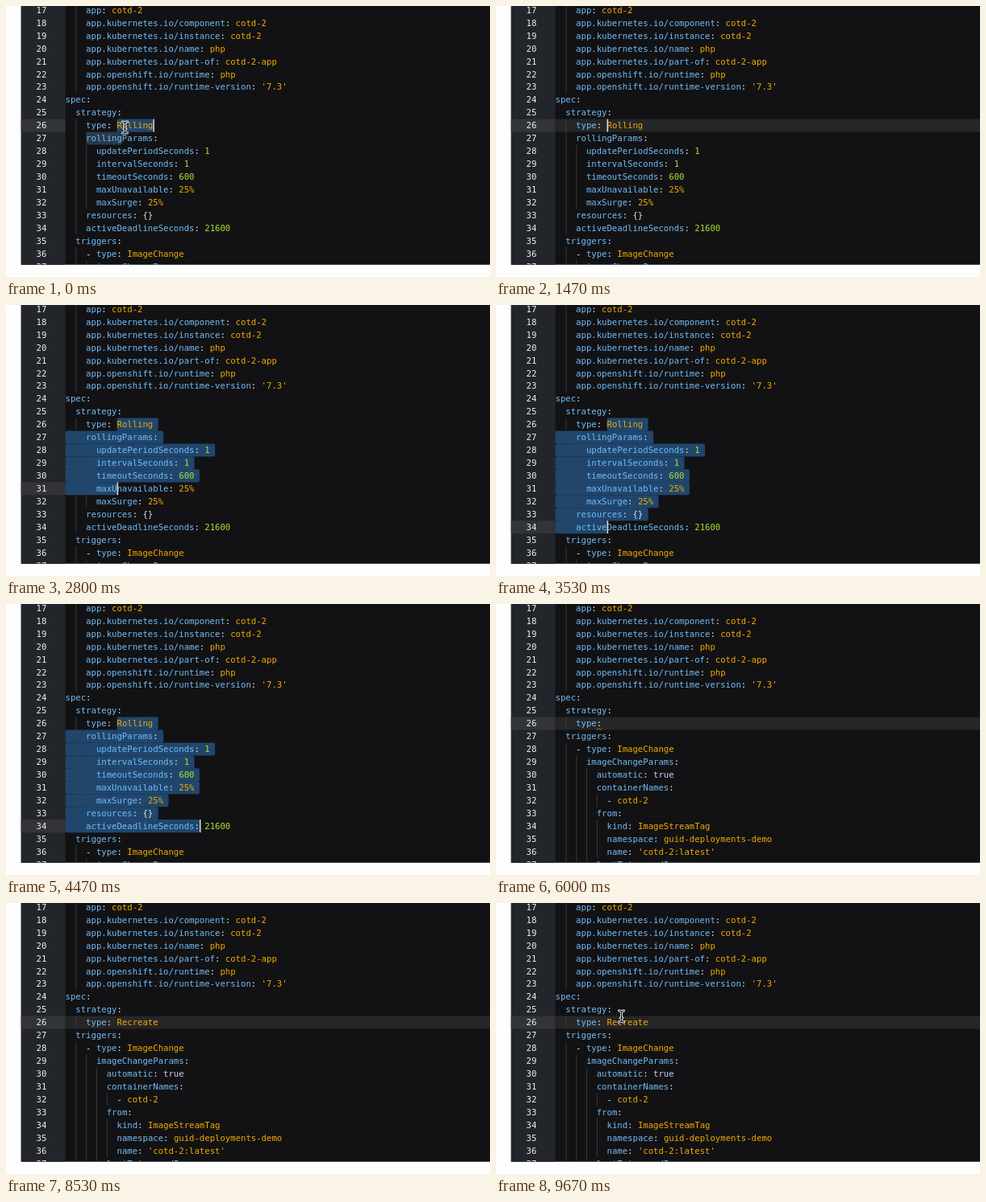
Write an HTML page that moves like this. It is 600 px wide and 337 px high and loops after 9.74 s.

```html
<!DOCTYPE html>
<html lang="en">
<head>
<meta charset="utf-8">
<title>YAML editor</title>
<style>
  html, body { margin: 0; width: 100%; height: 100%; overflow: hidden; background: #fefeff; }
  svg { display: block; width: 600px; height: 337px; }
  text { font: 10.63px "DejaVu Sans Mono", monospace; white-space: pre; fill: #e2e2e2; }
  .num { fill: #f0f0f0; }
  .key { fill: #73bcf7; }
  .str { fill: #f0ab00; }
  .int { fill: #ace12e; }
  .bool { fill: #d3ccff; }
  .guide { fill: #3c3c3e; }
  .sel { fill: #20466d; }
</style>
</head>
<body>
<svg viewBox="0 0 600 337">
  <defs><clipPath id="pane"><rect x="18.5" width="581.5" height="321.7"/></clipPath></defs>
  <g clip-path="url(#pane)">
    <rect x="18.5" width="582" height="322" fill="#121214"/>
    <rect x="18.5" width="55" height="322" fill="#22262a"/>
    <rect id="gutterBand" x="18.5" width="55" fill="#333438"/>
    <rect id="band" x="73.5" width="527" fill="#262628"/>
    <rect id="match" rx="2" fill="#28394a"/>
    <g id="selection"></g>
    <g id="head"></g>
    <g id="before"></g>
    <g id="after"></g>
    <path id="squiggle" fill="none" stroke="#6fae4f" stroke-width=".9"/>
    <rect id="caret" width="1.6" fill="#d8d8d8"/>
  </g>
  <g id="pointer" fill="none" stroke-linecap="round">
    <path stroke="#fff" stroke-width="2.8" d="M-3-7Q0-7 0-5Q0-7 3-7M0-5V5M-3 7Q0 7 0 5Q0 7 3 7M-1.5 2H1.5"/>
    <path stroke="#111" stroke-width="1.2" d="M-3-7Q0-7 0-5Q0-7 3-7M0-5V5M-3 7Q0 7 0 5Q0 7 3 7M-1.5 2H1.5"/>
  </g>
</svg>
<script>
const LOOP = 9740, CHAR = 6.4, ROW = 15.94, LEFT = 73.5;
const $ = id => document.getElementById(id);
const colX = c => LEFT + c * CHAR;
const rowY = n => 140.6 + (n - 26) * ROW;

const headText = `    app: cotd-2
    app.kubernetes.io/component: cotd-2
    app.kubernetes.io/instance: cotd-2
    app.kubernetes.io/name: php
    app.kubernetes.io/part-of: cotd-2-app
    app.openshift.io/runtime: php
    app.openshift.io/runtime-version: '7.3'
spec:
  strategy:`.split('\n');

const beforeText = `    type: Rolling
    rollingParams:
      updatePeriodSeconds: 1
      intervalSeconds: 1
      timeoutSeconds: 600
      maxUnavailable: 25%
      maxSurge: 25%
    resources: {}
    activeDeadlineSeconds: 21600
  triggers:
    - type: ImageChange
      imageChangeParams:`.split('\n');

const afterText = `    type: Recreate
  triggers:
    - type: ImageChange
      imageChangeParams:
        automatic: true
        containerNames:
          - cotd-2
        from:
          kind: ImageStreamTag
          namespace: guid-deployments-demo
          name: 'cotd-2:latest'
        lastTriggeredImage: >-`.split('\n');

function add(parent, tag, attrs = {}, text = '') {
  const el = document.createElementNS('http://www.w3.org/2000/svg', tag);
  for (const k in attrs) el.setAttribute(k, attrs[k]);
  el.textContent = text;
  return parent.appendChild(el);
}

function set(el, attrs) {
  for (const k in attrs) el.setAttribute(k, attrs[k]);
}

const show = (el, on) => el.setAttribute('visibility', on ? 'visible' : 'hidden');

function valueClass(v) {
  if (/^\d+$/.test(v)) return 'int';
  if (v === 'true') return 'bool';
  return /^[{>]/.test(v) ? 'punct' : 'str';
}

function drawLines(group, lines, first) {
  lines.forEach((line, i) => {
    const n = first + i, y = rowY(n) + 11.7;
    const [, pad, dash, key, colon, value] = line.match(/^( *)(- )?(?:([\w.\/-]+)(:) ?)?(.*)$/);
    for (let c = 2; c < pad.length; c += 2)
      add(group, 'rect', { class: 'guide', x: colX(c) + .2, y: rowY(n), width: .9, height: ROW });
    add(group, 'text', { class: 'num', x: 37.5, y }, n);
    const row = add(group, 'text', { x: colX(pad.length), y });
    if (dash) add(row, 'tspan', {}, dash);
    if (key) {
      add(row, 'tspan', { class: 'key' }, key);
      add(row, 'tspan', {}, colon + ' ');
    }
    const span = add(row, 'tspan', { class: valueClass(value) }, value);
    if (value === 'Recreate') typed = span;
  });
}

let typed;
drawLines($('head'), headText, 17);
drawLines($('before'), beforeText, 26);
drawLines($('after'), afterText, 26);

const selRects = beforeText.slice(0, 9).map((_, i) =>
  add($('selection'), 'rect', { class: 'sel', y: rowY(26 + i), height: ROW + .1, rx: 2 }));

for (const id of ['band', 'gutterBand', 'caret', 'match']) $(id).setAttribute('height', ROW);
set($('match'), { x: colX(4), y: rowY(27), width: 7 * CHAR });
$('squiggle').setAttribute('d', `M${colX(8)} ${rowY(26) + 14.2}l1.6 1.6l1.6-1.6l1.6 1.6l1.6-1.6`);

// Key presses, in ms
const COLLAPSE = 1100, DOWN = 1930, DOWN_STEP = 205, RIGHT = 3560, RIGHT_STEP = 56;
const REMOVE = 5400, TYPE = 6130, TYPE_STEP = 120, WORD = 'Recreate';
const steps = (t, start, step, max) =>
  t < start ? 0 : Math.min(max, 1 + Math.floor((t - start) / step));

// Caret place and the time of the last key press
function caretAt(t) {
  if (t < COLLAPSE) return { line: 26, col: 17, last: 0 };
  if (t < DOWN) return { line: 26, col: 10, last: COLLAPSE };
  if (t < REMOVE) {
    const down = steps(t, DOWN, DOWN_STEP, 8);
    const right = steps(t, RIGHT + RIGHT_STEP, RIGHT_STEP, 22);
    const last = right ? RIGHT + right * RIGHT_STEP : DOWN + (down - 1) * DOWN_STEP;
    return { line: 26 + down, col: 10 + right, last };
  }
  const n = steps(t, TYPE, TYPE_STEP, WORD.length);
  return { line: 26, col: 10 + n, last: n ? TYPE + (n - 1) * TYPE_STEP : REMOVE };
}

function drawSelection(line, col, on) {
  selRects.forEach((r, i) => {
    const n = 26 + i;
    show(r, on && n <= line);
    const from = n === 26 ? 10 : 0;
    const to = n === line ? col : beforeText[i].length + 1;
    set(r, { x: colX(from), width: Math.max(0, to - from) * CHAR });
  });
}

function drawPointer(t) {
  const p = Math.min(1, Math.max(0, (t - 8900) / 500));
  const e = p * p * (3 - 2 * p);
  show($('pointer'), t < COLLAPSE || t >= 8900);
  $('pointer').setAttribute('transform', `translate(${147.5 + 8 * e} ${151 - 10 * e})`);
}

function draw(t) {
  const { line, col, last } = caretAt(t);
  const selecting = t < COLLAPSE || (t >= DOWN && t < REMOVE);
  const removed = t >= REMOVE;
  show($('before'), !removed);
  show($('after'), removed);
  typed.textContent = WORD.slice(0, removed ? col - 10 : 0);
  drawSelection(line, col, selecting);
  show($('match'), t < COLLAPSE);
  show($('band'), !selecting);
  set($('band'), { y: rowY(line) });
  set($('gutterBand'), { y: rowY(line) });
  show($('squiggle'), t >= 5900 && t < TYPE + 2 * TYPE_STEP);
  set($('caret'), { x: colX(col), y: rowY(line) });
  show($('caret'), (t - last) % 1000 < 500);
  drawPointer(t);
}

const start = performance.now();
function tick() {
  draw((performance.now() - start) % LOOP);
  requestAnimationFrame(tick);
}
tick();
</script>
</body>
</html>
```
